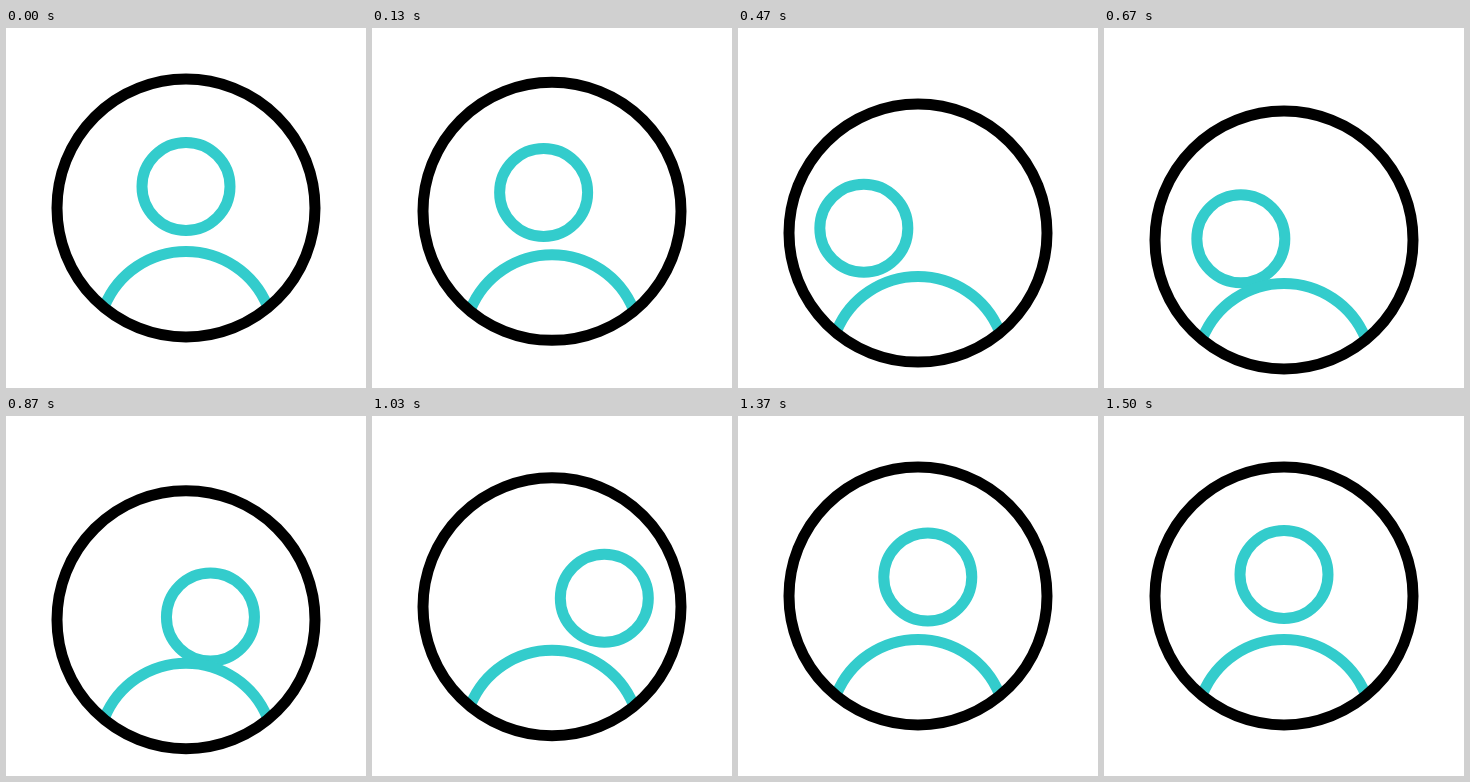
Recreate the animation shown at these times as an HTML page. Size 360 px wide and 360 px high, loop 2 s.

```html
<!DOCTYPE html>
<html lang="en">
<head>
<meta charset="utf-8">
<title>Profile icon</title>
<style>
  html, body { margin: 0; width: 100%; height: 100%; overflow: hidden; background: #fff; }
  svg { display: block; width: 100vw; height: 100vh; }
  circle, path { fill: none; stroke: #3cc; stroke-width: 11; }
  #ring { stroke: #000; }
</style>
</head>
<body>
<svg viewBox="0 0 360 360">
  <g id="badge">
    <circle id="head" cx="180" cy="158.5" r="44"/>
    <path d="M98.6 278A88 88 0 0 1 261.4 278"/>
    <circle id="ring" cx="180" cy="180" r="129"/>
  </g>
</svg>
<script>
  const LOOP = 2000;
  const badge = document.getElementById('badge');
  const head = document.getElementById('head');

  // Keys are [step, x, y, sag]; sag bows the path leading to the key.
  const DROP = [[0, 0, 0, 0], [20, 0, 32, 0], [38, 0, 0, 0]];
  const ROLL = [[0, 0, 0, 0], [16.8, -58.5, 18, 0], [30.5, 52.5, 13, 6], [45, 0, 0, 0]];

  const ease = p => p * p * (3 - 2 * p);

  function pose(keys, n) {
    const i = keys.findIndex(k => k[0] > n);
    if (i < 0) return keys[keys.length - 1].slice(1, 3);
    const [n0, x0, y0] = keys[i - 1];
    const [n1, x1, y1, sag] = keys[i];
    const s = ease((n - n0) / (n1 - n0));
    return [x0 + (x1 - x0) * s, y0 + (y1 - y0) * s + 4 * sag * s * (1 - s)];
  }

  const move = (el, [x, y]) => el.setAttribute('transform', `translate(${x} ${y})`);

  function draw(now) {
    // 30 steps per second, on a 10 ms clock
    const n = Math.floor((now % LOOP) * 0.03 + 0.15);
    move(badge, pose(DROP, n));
    move(head, pose(ROLL, n));
  }

  const start = performance.now();
  function tick() {
    draw(performance.now() - start);
    requestAnimationFrame(tick);
  }
  tick();
</script>
</body>
</html>
```
